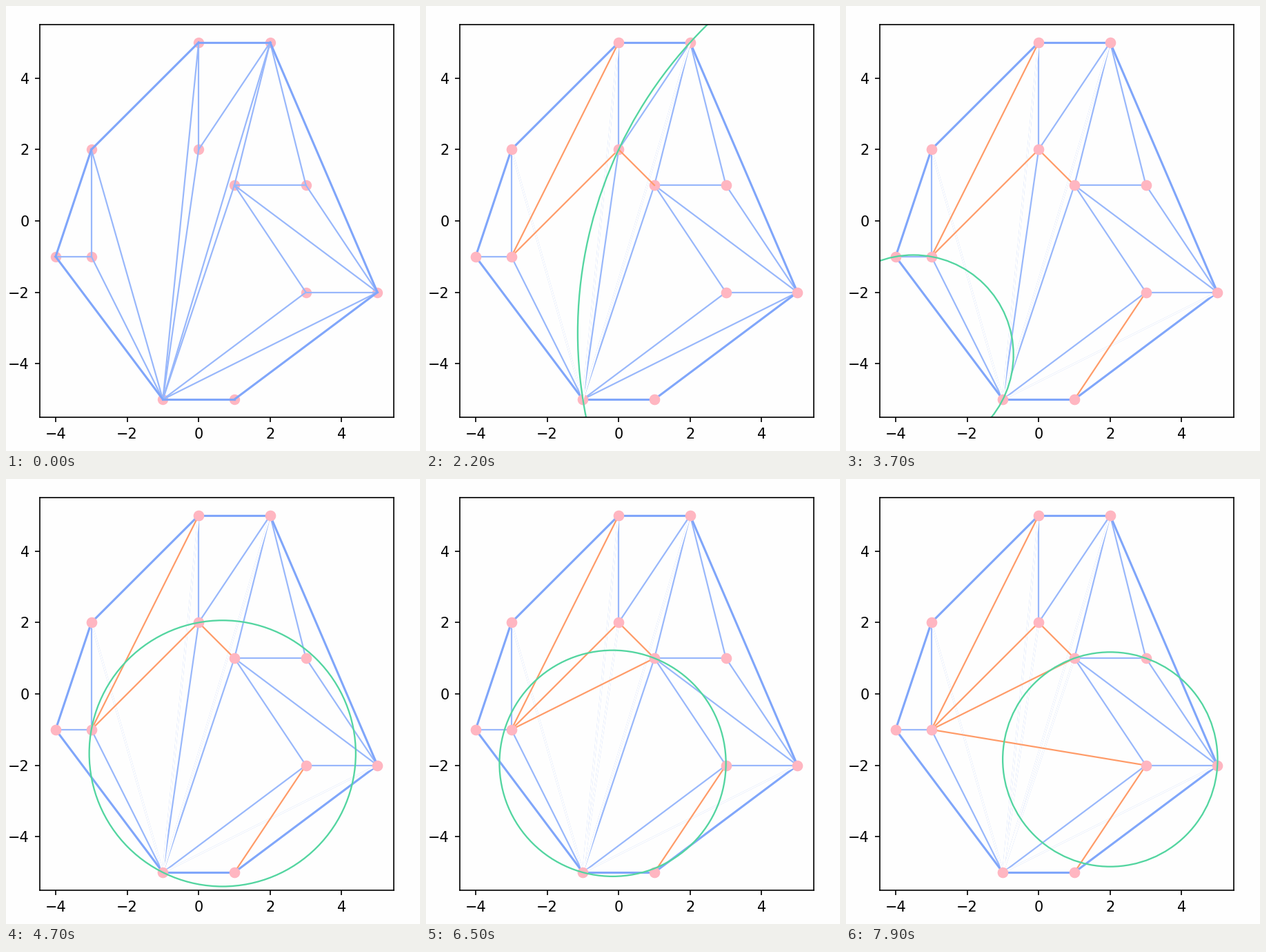
Write a matplotlib script that moves like this. It is 600 by 646 pixels and loops after 8 s.

```python
import matplotlib.pyplot as plt
import numpy as np
from matplotlib.animation import FuncAnimation
from matplotlib.patches import Circle

W, H, DPI = 600, 646, 100
PX = 72 / DPI  # points per pixel
FRAMES, STEP_MS = 80, 100

BG, PINK = "#fefefe", "#ffb6c1"
HULL, EDGE, NEW, RING = "#80a6fa", "#98b7fb", "#ff9b68", "#53d5a0"

P = dict(A=(0, 5), B=(2, 5), C=(-3, 2), D=(0, 2), E=(1, 1), F=(3, 1),
         G=(-4, -1), H=(-3, -1), I=(3, -2), J=(5, -2), K=(-1, -5), L=(1, -5))

OUTLINE = "AB AC CG GK KL LJ JB".split()
INNER = ("CH GH HK CK AK AD DK DB BK BE EK "
         "EF FB FJ EJ EI IJ IK KJ").split()

# (start ms, tested triangle, flip ms, removed edge, added edge)
CHECKS = [
    (100, "ACK", 600, "CK", "AH"),
    (1000, "ADK", 1400, "AK", "DH"),
    (1800, "DBK", 2200, "BK", "DE"),
    (2600, "KLJ", 3000, "KJ", "IL"),
    (3400, "GHK"),
    (3800, "CGH"),
    (4700, "DHK", 5100, "DK", "EH"),
    (5600, "HDE"),
    (6100, "ABD"),
    (6500, "EIK", 6900, "EK", "HI"),
    (7300, "BEF"),
    (7700, "EFJ"),
]

fig = plt.figure(figsize=(W / DPI, H / DPI), dpi=DPI, facecolor=BG)
ax = fig.add_axes([48.6 / W, 1 - 597 / H, 513 / W, 570 / H], facecolor=BG)
ax.set(xlim=(-4.45, 5.45), ylim=(-5.5, 5.5),
       xticks=range(-4, 5, 2), yticks=range(-4, 5, 2))
ax.tick_params(labelsize=15, length=7.3 * PX, width=1.67 * PX, pad=7.3 * PX)
for spine in ax.spines.values():
    spine.set(linewidth=1.67 * PX, zorder=90)


def segment(name, color, width, z):
    x, y = zip(*(P[c] for c in name))
    return ax.plot(x, y, color=color, lw=width * PX, zorder=z)[0]


def dots(z):
    x, y = zip(*P.values())
    return ax.scatter(x, y, s=(15.4 * PX) ** 2, c=PINK, linewidths=0, zorder=z)


def circumcircle(tri):
    a, b, c = (np.array(P[k], float) for k in tri)
    m = 2 * np.array([b - a, c - a])
    center = np.linalg.solve(m, [b @ b - a @ a, c @ c - a @ a])
    return center, np.hypot(*(a - center))


def ring(tri):
    center, r = circumcircle(tri)
    return ax.add_patch(Circle(center, r, fill=False, ec=RING,
                               lw=2.3 * PX, zorder=80))


dots(1)
for name in INNER:
    segment(name, EDGE, 2.2, 2)
for name in OUTLINE:
    segment(name, HULL, 3.1, 3)

rings = [ring(check[1]) for check in CHECKS]
flips = []
for k, check in enumerate(CHECKS):
    if len(check) > 2:
        _, _, when, old, new = check
        flips.append((when, segment(old, BG, 2.4, 10 + 2 * k)))
        flips.append((when, segment(new, NEW, 2.2, 10.5 + 2 * k)))
top_dots = dots(9)


def update(i):
    t = i * STEP_MS
    current = sum(check[0] <= t for check in CHECKS) - 1
    for k, circle in enumerate(rings):
        circle.set_visible(k == current)
    for when, line in flips:
        line.set_visible(t >= when)
    # points are repainted at each new check, below the edges it flips
    top_dots.set_visible(current > 0)
    top_dots.set_zorder(9.5 + 2 * current)
    return []


anim = FuncAnimation(fig, update, frames=FRAMES, interval=STEP_MS,
                     repeat=True, repeat_delay=0, blit=False)
plt.show()
```
